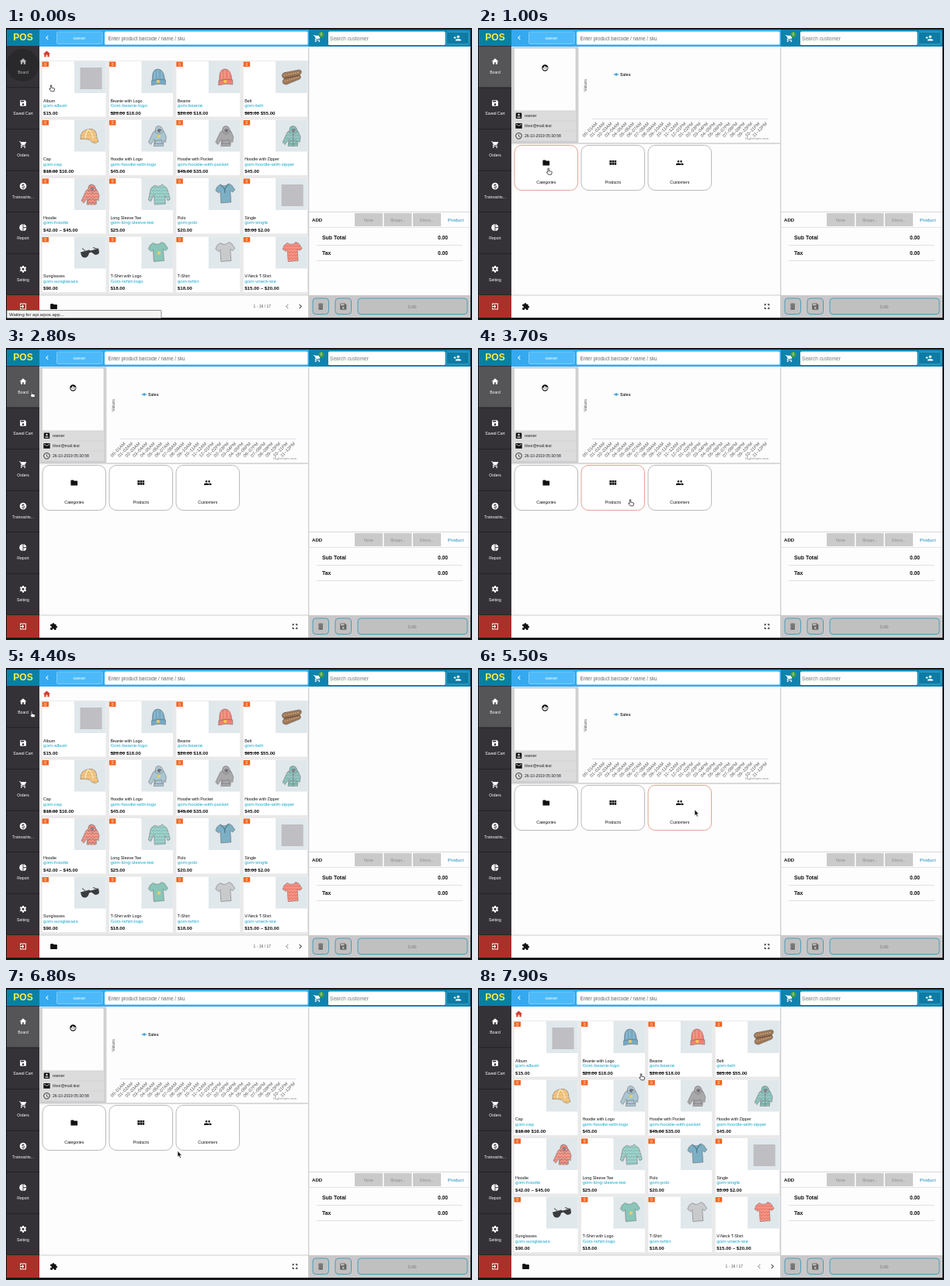
Write an HTML page that moves like this. It is 600x377 px and loops after 8 s.

```html
<!DOCTYPE html>
<html lang="en">
<head>
<meta charset="utf-8">
<title>Point of sale</title>
<style>
html, body { margin: 0; width: 100%; height: 100%; overflow: hidden; background: #17171b; }
svg { display: block; width: 600px; height: 377px; }
text { font-family: "Liberation Sans", Arial, sans-serif; white-space: pre; }
</style>
</head>
<body>
<svg id="stage" viewBox="0 0 600 377"></svg>
<script>
// Icons on a 24-unit grid, filled with the even-odd rule.
const ICONS = {
  home: 'M10 20v-6h4v6h5v-8h3L12 3 2 12h3v8z',
  save: 'M17 3H5a2 2 0 0 0-2 2v14a2 2 0 0 0 2 2h14a2 2 0 0 0 2-2V7zM5 5h10v4H5zM9 16a3 3 0 1 0 6 0a3 3 0 1 0-6 0z',
  cart: 'M1 2v2h2l4 8-2 3q-1 2 2 2h12v-2H8l1-2h7q1 0 2-1l4-8H5L4 2zM5 20a2 2 0 1 0 4 0a2 2 0 1 0-4 0zM15 20a2 2 0 1 0 4 0a2 2 0 1 0-4 0z',
  money: 'M2 12a10 10 0 1 0 20 0a10 10 0 1 0-20 0zM11 5h2v2q3 0 3 3h-2q0-1-2-1-2 0-2 1 0 1 2 1 5 1 5 4 0 2-4 3v2h-2v-2q-3-1-3-3h2q0 1 2 1 3 0 3-1 0-1-3-2-4-1-4-3 0-2 3-3z',
  pie: 'M11 2v20A10 10 0 0 1 11 2zM13 2a10 10 0 0 1 9 9h-9zM13 13h9a10 10 0 0 1-9 9z',
  gear: 'M10 2h4l.6 3 2 1 3-1 2 3.5-2.3 2v3l2.3 2-2 3.5-3-1-2 1-.6 3h-4l-.6-3-2-1-3 1-2-3.5 2.3-2v-3l-2.3-2 2-3.5 3 1 2-1zM8.5 12a3.5 3.5 0 1 0 7 0a3.5 3.5 0 1 0-7 0z',
  exit: 'M3 3h18v18H3v-6h2v4h14V5H5v4H3zM10 7l5 5-5 5-1.4-1.4L11 13H3v-2h8L8.6 8.4z',
  folder: 'M10 4H4Q2 4 2 6v12q0 2 2 2h16q2 0 2-2V8q0-2-2-2h-8z',
  grid: 'M2 5h6v6H2zM9 5h6v6H9zM16 5h6v6h-6zM2 12h6v6H2zM9 12h6v6H9zM16 12h6v6h-6z',
  people: 'M5 8a3 3 0 1 0 6 0a3 3 0 1 0-6 0zM13 8a3 3 0 1 0 6 0a3 3 0 1 0-6 0zM1 19v-3q0-3 7-3t7 3v3zM16 19v-3q0-2-1-3 8 0 8 3v3z',
  addUser: 'M11 8a4 4 0 1 0 8 0a4 4 0 1 0-8 0zM7 20v-2q0-4 8-4t8 4v2zM6 10V7H4v3H1v2h3v3h2v-3h3v-2z',
  face: 'M2 12a10 10 0 1 0 20 0a10 10 0 1 0-20 0zM4 12q5-1 7-6 3 4 9 4a8 8 0 1 1-16 2zM7.5 13a1.5 1.5 0 1 0 3 0a1.5 1.5 0 1 0-3 0zM13.5 13a1.5 1.5 0 1 0 3 0a1.5 1.5 0 1 0-3 0z',
  badge: 'M3 5q0-2 2-2h14q2 0 2 2v14q0 2-2 2H5q-2 0-2-2zM9 9a3 3 0 1 0 6 0a3 3 0 1 0-6 0zM6 18h12v-1q0-3-6-3t-6 3z',
  mail: 'M2 4h20v16H2zM4 6v2l8 5 8-5V6l-8 5z',
  clock: 'M2 12a10 10 0 1 0 20 0a10 10 0 1 0-20 0zM4 12a8 8 0 1 0 16 0a8 8 0 1 0-16 0zM11 7h1.5v5.3l4.5 2.5-1 1.2-5-3z',
  puzzle: 'M20 11h-1V7q0-2-2-2h-4V4a2.5 2.5 0 0 0-5 0v1H4Q2 5 2 7v4h2a2.6 2.6 0 0 1 0 5H2v4q0 2 2 2h4v-2a2.6 2.6 0 0 1 5 0v2h4q2 0 2-2v-4h1a2.5 2.5 0 0 0 0-5z',
  expand: 'M5 14v5h5v-2H7v-3zM5 10h2V7h3V5H5zM17 14v3h-3v2h5v-5zM14 5v2h3v3h2V5z',
  trash: 'M6 19q0 2 2 2h8q2 0 2-2V7H6zM9 9h1v9H9zM14 9h1v9h-1zM15 4l-1-1h-4L9 4H5v2h14V4z',
  prev: 'M15.4 7.4L14 6l-6 6 6 6 1.4-1.4L10.8 12z',
  next: 'M10 6L8.6 7.4 13.2 12l-4.6 4.6L10 18l6-6z'
};

const rect = (x, y, w, h, fill, more = '') =>
  `<rect x="${x}" y="${y}" width="${w}" height="${h}" fill="${fill}" ${more}/>`;
const text = (x, y, size, str, fill = '#222', more = '') =>
  `<text x="${x}" y="${y}" font-size="${size}" fill="${fill}" ${more}>${str}</text>`;
const icon = (name, x, y, size, fill) =>
  `<path transform="translate(${x - size / 2} ${y - size / 2}) scale(${size / 24})" fill="${fill}" fill-rule="evenodd" d="${ICONS[name]}"/>`;
const path = (d, fill, more = '') => `<path d="${d}" fill="${fill}" ${more}/>`;
const group = (id, body) => `<g id="${id}">${body}</g>`;
const MID = ' text-anchor="middle" ', END = ' text-anchor="end" ', BOLD = ' font-weight="bold" ';

// Product drawings on a 41-unit square.
const INK = 'stroke="#6b605e" stroke-width=".5" stroke-linejoin="round"';
const DOT = '<circle cx="22.5" cy="21" r="2" fill="#f2cf52"/>';
const HOODIE = 'M19 13L15 16 9 29 12 32 17 25 16 34H28L29 27 31 29 32 22 29 15 26 13z';
const SWEATER = 'M17 9L12 13 9 28 12 30 16 21 17 34 31 33 30 22 34 29 37 27 33 13 27 8Q22 12 17 9z';
const TEE = 'M15 8L11 11 9 16 13 19 15 17 16 32 29 31 28 16 31 18 34 15 30 9 26 7Q21 12 15 8z';
const CAP = 'M8 25Q7 14 18 12T29 23L31 28Q25 33 20 26 14 24 8 25z';
const print = d => path(d, 'url(#print)');
const ART = {
  plate: c => rect(7.5, 8, 28, 28, c),
  beanie: c => path('M14 25Q13 10 21 10T30 24z', c, INK) + path('M13 25Q21 22 31 24V30Q22 28 13 31z', c, INK) +
    path('M17 23V13M21 22V11M26 22V13', 'none', 'stroke="#fff" stroke-opacity=".3"') + '<circle cx="21.5" cy="26" r="2" fill="#f2cf52"/>',
  belt: c => path('M8 18Q9 14 14 14L30 11Q34 11 33 15L31 18Q34 20 31 23L14 30Q8 30 9 25L11 22Q8 21 8 18z', c, INK) +
    path('M10 18L31 14M11 26L31 20', 'none', 'stroke="#dfb27a" stroke-dasharray="2 1"') + path('M11 22L31 18', 'none', 'stroke="#5d4b3c"'),
  cap: c => path(CAP, c, INK) + print(CAP) + path('M18 12Q14 18 14 24M18 12Q24 17 24 25', 'none', 'stroke="#fff3d2"'),
  hoodie: c => path(HOODIE, c, INK) + path('M18 16Q17 8 22 8T28 15L23 19z', c, INK) + path('M20 14Q22 10 26 13L23 17z', '#77727a') +
    path('M18 27L26 26 27 31H17z', 'none', INK),
  sweater: c => path(SWEATER, c, INK) + print(SWEATER),
  polo: c => path(TEE, c, INK) + path('M15 8L21 14 26 7M21 14V19', 'none', 'stroke="#39687d"'),
  shades: c => path('M8 20L19 17 21 18 31 15 32 20Q31 24 26 23L22 20 19 21Q18 27 13 27 9 27 8 20z', c) + path('M14 18L10 15M30 16L24 14', 'none', `stroke="${c}"`),
  tee: c => path(TEE, c, INK)
};

// name, slug, price, old price, drawing, colour, extra mark
const PRODUCTS = [
  ['Album', 'gom-album', '$15.00', '', 'plate', '#bfbec2'],
  ['Beanie with Logo', 'Gom-beanie-logo', '$18.00', '$20.00', 'beanie', '#74aac5'],
  ['Beanie', 'gom-beanie', '$18.00', '$20.00', 'beanie', '#f08272'],
  ['Belt', 'gom-belt', '$55.00', '$65.00', 'belt', '#9c7759'],
  ['Cap', 'gom-cap', '$16.00', '$18.00', 'cap', '#efbb70'],
  ['Hoodie with Logo', 'gom-hoodie-with-logo', '$45.00', '', 'hoodie', '#a9c6d2', DOT],
  ['Hoodie with Pocket', 'gom-hoodie-with-pocket', '$35.00', '$45.00', 'hoodie', '#a8a8aa'],
  ['Hoodie with Zipper', 'gom-hoodie-with-zipper', '$45.00', '', 'hoodie', '#80bbb5', print(HOODIE) + path('M22.5 18V34', 'none', INK)],
  ['Hoodie', 'gom-hoodie', '$42.00 – $45.00', '', 'hoodie', '#e88578', print(HOODIE)],
  ['Long Sleeve Tee', 'gom-long-sleeve-tee', '$25.00', '', 'sweater', '#8cc6be'],
  ['Polo', 'gom-polo', '$20.00', '', 'polo', '#7cafc4'],
  ['Single', 'gom-single', '$2.00', '$3.00', 'plate', '#bfbec2'],
  ['Sunglasses', 'gom-sunglasses', '$90.00', '', 'shades', '#3b3b3d'],
  ['T-Shirt with Logo', 'Gom-tshirt-logo', '$18.00', '', 'tee', '#88c6ba', DOT],
  ['T-Shirt', 'gom-tshirt', '$18.00', '', 'tee', '#c9cacc'],
  ['V-Neck T-Shirt', 'gom-vneck-tee', '$15.00 – $20.00', '', 'tee', '#ee8070', print(TEE)]
];

function card([name, slug, price, old, art, colour, mark = ''], n) {
  const x = 46.5 + n % 4 * 86.4, y = 43 + Math.floor(n / 4) * 75.5;
  const was = old && `<tspan text-decoration="line-through">${old}</tspan> `;
  return `<g transform="translate(${x} ${y})">` +
    rect(0, 0, 82, 71.5, '#fff') + rect(41.5, 0, 40.5, 41, '#e0e8ec') +
    `<g transform="translate(41.5 0)">${ART[art](colour)}${mark}</g>` +
    rect(0, .5, 8.5, 6.5, '#f26522') + text(4.2, 5.7, 5, 0, '#fff', MID) +
    text(1.5, 52.5, 5.35, name, '#111') + text(1.5, 59.3, 6.15, slug, '#13a9cc') +
    text(1.5, 68.5, 6.15, was + price, '#111', BOLD) + '</g>';
}

const pager = (label, nextFill) => text(341, 361, 5, label, '#555', END) +
  icon('prev', 362, 359.5, 12, '#999') + icon('next', 379, 359.5, 12, nextFill);
const crumbs = rect(43, 24, 347, 18, '#fdfdfd') + icon('home', 52.5, 33.5, 11, '#d53a2e');

function productScene() {
  return rect(43, 24, 347, 321, '#e9e9ea') + crumbs + PRODUCTS.map(card).join('') +
    icon('folder', 61.5, 359.5, 10.5, '#111') + pager('1 - 16 / 17', '#444');
}

function categoryScene() {
  const tiles = ['CLOTHING', 'DECOR', 'MUSIC'].map((label, n) => {
    const x = 45 + n % 2 * 172.7, y = 42 + (n >> 1) * 75.8;
    return rect(x, y, 171, 74, '#b7b5b7', 'stroke="#cbcacb" stroke-width=".8"') +
      rect(x + 2.5, y + 29, 166, 16, '#4b4a4a') +
      text(x + 85.5, y + 39, 5.1, label, '#fff', MID + BOLD);
  });
  return rect(43, 24, 347, 321, '#e1e0e2') + crumbs + tiles.join('') +
    icon('grid', 61.5, 359.5, 10, '#111') + pager('1 - 3 / 3', '#999');
}

const TILES = [['Categories', 'folder'], ['Products', 'grid'], ['Customers', 'people']];
const TILE = { x: 47, y: 151.5, w: 81.5, h: 58, step: 86 };

function boardScene() {
  const hour = h => String(h > 12 ? h - 12 : h).padStart(2, '0');
  const hours = Array.from({ length: 24 }, (_, h) => {
    const x = 154 + h * 9.5, label = `${hour(h)}–${hour(h + 1)}${h < 12 ? 'A' : 'P'}M`;
    return text(x, 124, 5.7, label, '#555', END + `transform="rotate(-45 ${x} 124)"`);
  });
  const info = [['badge', 'owner'], ['mail', 'tilvor@mail.test'], ['clock', '26-10-2019 05:30:58']].map(([name, label], n) =>
    rect(46, 107.5 + n * 13, 80.5, 12, '#dddcdd') + icon(name, 52.5, 113.3 + n * 13, 10, '#111') +
    text(60, 115.3 + n * 13, n ? 5.05 : 5.7, label));
  const tiles = TILES.map(([label, name], n) => {
    const x = TILE.x + n * TILE.step, mid = x + TILE.w / 2;
    return rect(x, TILE.y, TILE.w, TILE.h, '#fff', 'class="tile" rx="9" stroke-width=".9"') +
      icon(name, mid, 174, 10.5, '#111') + text(mid, 201.3, 5.2, label, '#111', MID);
  });
  return rect(43, 24, 347, 321, '#fdfdfd') + rect(44, 25, 84, 122.5, '#d4d3d5', 'stroke="#bbb" stroke-width=".8"') +
    rect(47, 26.5, 78.5, 80, '#fdfdfd') + icon('face', 86.3, 51.5, 10, '#111') + info.join('') +
    rect(128, 24, 1.5, 125, '#d8d7d9') + rect(43, 148, 347, 2, '#dad9db') +
    text(140, 74, 5.4, 'Values', '#555', MID + 'transform="rotate(-90 140 74)"') +
    rect(174.5, 59.5, 7, .9, '#39a0dc') + '<circle cx="178" cy="60" r="1.7" fill="#39a0dc"/>' +
    text(183, 62, 5.2, 'Sales', '#333', BOLD) + rect(147, 117.3, 227, .6, '#ccd') + hours.join('') +
    text(374, 143.5, 4.3, 'Highcharts.com', '#888', END) + tiles.join('') +
    icon('puzzle', 61.5, 359.5, 10.5, '#111') + icon('expand', 372, 359.5, 11, '#111');
}

function sidebar() {
  const items = [['home', 'Board'], ['save', 'Saved Cart'], ['cart', 'Orders'], ['money', 'Transactio...'], ['pie', 'Report'], ['gear', 'Setting']];
  return rect(1, 23, 42, 322, '#343236') + rect(1, 24, 42, 53, '#555456', 'id="active"') +
    items.map(([name, label], n) => {
      const y = n * 53.6;
      return rect(1, 76.5 + y, 42, .8, '#1d1c1f') + icon(name, 22, 43.3 + y, 10.5, '#fff') +
        text(22, 58.8 + y, 5.1, label, '#fff', MID);
    }).join('') +
    '<circle id="ripple" cx="21.5" cy="48" r="21" fill="#111" opacity=".3"/>' +
    rect(1, 345, 42, 29, '#aa3029') + icon('exit', 22, 359.5, 10.5, '#fff');
}

function header() {
  return rect(1, 2, 42, 21, '#0b7fa3') + text(22, 15.5, 12, 'POS', '#f4ee4e', MID + BOLD) +
    rect(43, 2, 347, 22, '#35a9ef') + icon('prev', 53, 12.5, 11, '#fff') +
    rect(65.5, 5, 58.5, 15.5, '#4cbafa', 'rx="1.5" stroke="#8bd3fb" stroke-width=".8"') +
    text(94.5, 15, 5.9, 'owner', '#fff', MID) +
    rect(127, 4.5, 261.5, 17, '#fff', 'rx="1.5"') + text(131.5, 15.5, 6.35, 'Enter product barcode / name / sku', '#666') +
    rect(390, 2, 208, 22, '#0e83af') + icon('cart', 401, 13.5, 11, '#fff') +
    '<circle cx="406" cy="8.5" r="3.7" fill="#3c9b45"/>' + text(406, 10.3, 5, 0, '#fff', MID) +
    rect(415, 4.5, 150.5, 17.5, '#fff', 'rx="1.5"') + text(417, 15.5, 6.6, 'Search customer', '#777') +
    rect(567, 5, 29, 16, '#0c7ba5', 'rx="1.5" stroke="#58b4d3" stroke-width=".8"') + icon('addUser', 581, 13, 10.5, '#fff');
}

function orderPanel() {
  const modes = ['Note', 'Shippi...', 'Disco...'].map((label, n) =>
    rect(449 + n * 37.5, 239, 36, 17, '#cbcacb') + text(467 + n * 37.5, 249.8, 5.6, label, '#8d8c8d', MID));
  const totals = ['Sub Total', 'Tax'].map((label, n) =>
    text(407, 273 + n * 20.3, 6.9, label, '#111', BOLD) +
    text(569, 273 + n * 20.3, 6.7, '0.00', '#111', BOLD + END) + rect(400, 280 + n * 20.3, 188, .7, '#d5d4d6'));
  const button = (x, w) => rect(x, 349, w, 20.5, '#c1c0c1', 'rx="4" stroke="#3c9cb8" stroke-width=".9"');
  return rect(390, 24, 208, 321, '#fdfdfe') + rect(390, 237, 208, .8, '#cfced0') + rect(390, 257, 208, .8, '#e0dfe1') +
    text(394, 249.8, 6.1, 'ADD', '#111', BOLD) + modes.join('') + text(579, 249.8, 5.9, 'Product', '#1687c4', MID) + totals.join('') +
    rect(390, 345, 208, 29, '#c9c8ca') + button(395, 20.5) + button(424, 20.5) + button(453, 141) +
    icon('trash', 405.2, 359.5, 11, '#666') + icon('save', 434.2, 359.5, 11, '#666') + text(523, 361.5, 5.7, '0.00', '#757476', MID);
}

const status = rect(1, 364.5, 199, 10, '#f4f4f4', 'rx="1" stroke="#777" stroke-width=".8"') +
  text(4, 371.5, 6, 'Waiting for api.wpos.app...');
const hand = path('M-1 0Q0-1 1 0V4L5 5Q6 5 6 6L5 10H0L-3 6Q-3 5-1 6z', '#fff', 'transform="scale(.78)" stroke="#222" stroke-linejoin="round"');
const arrow = path('M0 0V7.5L1.7 6 3 9 4.3 8.4 3 5.5H5.3z', '#111', 'stroke="#fff" stroke-width=".5"');

const stage = document.getElementById('stage');
stage.innerHTML = '<defs><pattern id="print" width="4" height="4" patternUnits="userSpaceOnUse">' +
  '<path d="M0 1L2 3 4 1" fill="none" stroke="#fff" stroke-opacity=".35"/></pattern></defs>' +
  rect(0, 0, 600, 377, '#17171b') + header() + sidebar() + rect(43, 345, 347, 29, '#fdfdfd') +
  group('products', productScene()) + group('categories', categoryScene()) + group('board', boardScene()) +
  rect(43, 344.3, 347, 1.3, '#dad9db') + orderPanel() + rect(389, 24, 1.3, 350, '#cfced1') +
  group('status', status) + group('pointer', group('hand', hand) + group('arrow', arrow));

// Start times of scenes, and [time, x, y] of the pointer's stops.
const SCENES = [[0, 'products'], [500, 'board'], [1500, 'categories'], [2700, 'board'], [3900, 'products'], [4700, 'board'], [7300, 'products']];
const MOVES = [[0, 58, 74], [300, 60, 80], [1100, 92, 186], [1500, 92, 186], [1800, 117.5, 124], [2400, 33, 56], [2800, 33, 56],
  [3600, 196, 196], [3900, 196, 196], [4400, 33, 56], [4800, 33, 56], [5500, 279, 183], [6000, 279, 183],
  [6800, 221, 210.5], [7100, 203, 188], [7400, 203, 188], [7900, 210, 111], [8000, 210, 111]];
const CLICKS = [-100, 2500, 4500]; // presses on the Board entry

const el = id => document.getElementById(id);
const show = (id, on) => el(id).style.display = on ? '' : 'none';
const tiles = document.querySelectorAll('.tile');

function pointerAt(t) {
  const n = MOVES.findIndex(m => m[0] > t);
  const [t0, x0, y0] = MOVES[n - 1], [t1, x1, y1] = MOVES[n];
  const p = (t - t0) / (t1 - t0), k = p * p * (3 - 2 * p);
  return [x0 + (x1 - x0) * k, y0 + (y1 - y0) * k];
}

function draw(now) {
  const t = Math.floor(now % 8000 / 100) * 100; // ten steps a second
  const scene = SCENES.filter(s => s[0] <= t).pop()[1];
  const [x, y] = pointerAt(t);
  let over = -1;
  tiles.forEach((tile, n) => {
    const dx = x - TILE.x - n * TILE.step, dy = y - TILE.y;
    const inside = dx >= 0 && dx <= TILE.w && dy >= 0 && dy <= TILE.h;
    if (inside) over = n;
    tile.setAttribute('stroke', inside ? '#e39a86' : '#b5b3b5');
  });
  ['products', 'categories', 'board'].forEach(id => show(id, id === scene));
  show('active', scene === 'board');
  show('ripple', CLICKS.some(c => t >= c && t < c + 300));
  show('status', t < 500);
  const pointing = scene !== 'board' || x < 43 || over === 0 || over === 1;
  show('hand', pointing);
  show('arrow', !pointing);
  el('pointer').setAttribute('transform', `translate(${x} ${y})`);
  requestAnimationFrame(draw);
}
draw(0);
</script>
</body>
</html>
```
